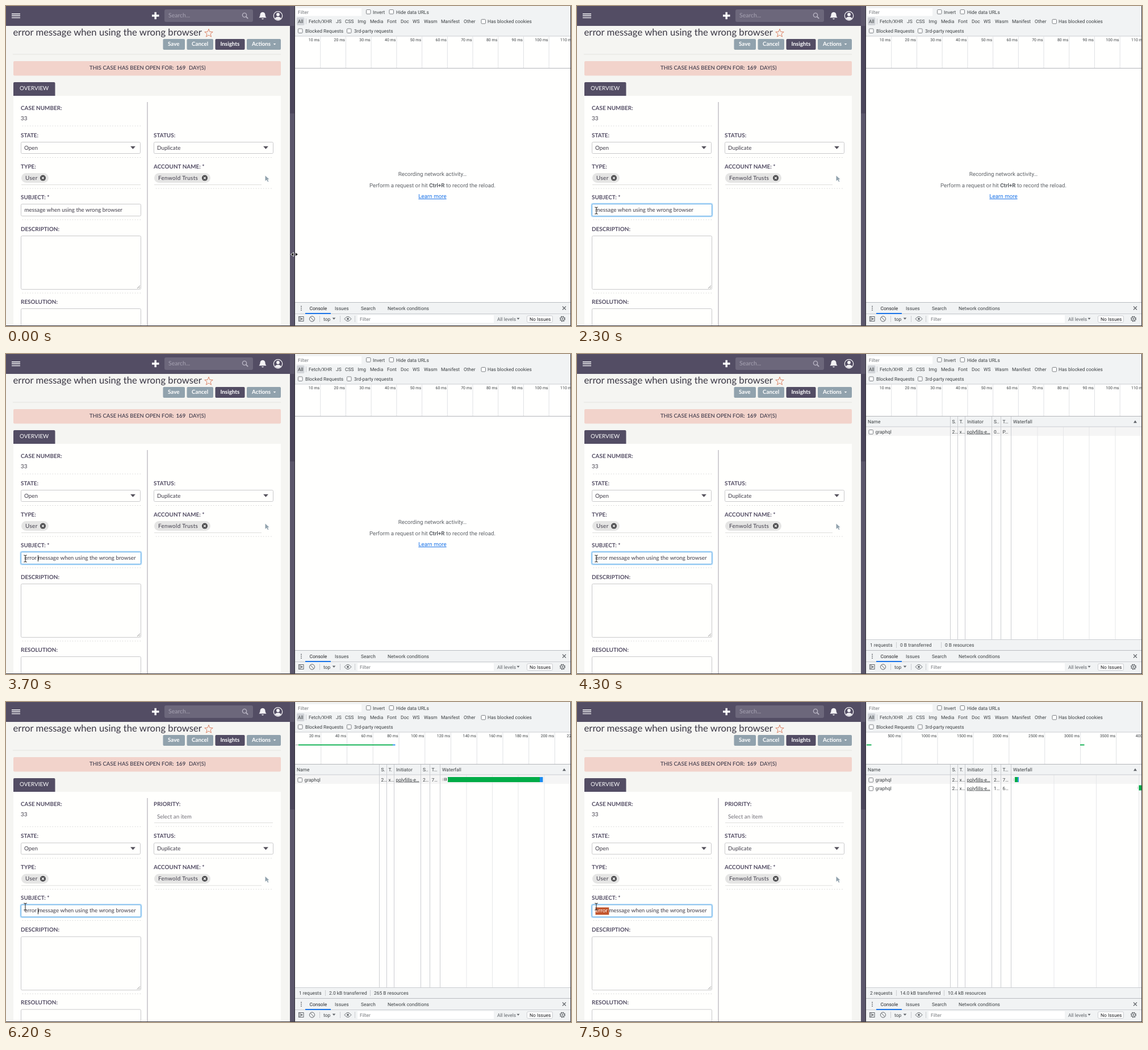
Animation of 995x563 px, one loop 8000 ms. Source, as an HTML page:

```html
<!DOCTYPE html>
<html lang="en">
<head>
<meta charset="utf-8">
<title>Case form and network panel</title>
<style>
html, body { margin: 0; width: 100%; height: 100%; overflow: hidden; background: #f5f5f2; }
svg { display: block; width: 995px; height: 563px; }
text { white-space: pre; fill: #403d4a; text-rendering: geometricPrecision; }
.l { font: 9.85px Lato, sans-serif; }
.b { font: 700 9.95px Lato, sans-serif; fill: #534d64; }
.w { font: 700 9.8px Lato, sans-serif; fill: #fff; }
.n { font: 600 9.6px Lato, sans-serif; fill: #4b4654; }
.chip { font: 10px Lato, sans-serif; letter-spacing: .3px; }
.title { font: 16.7px Lato, sans-serif; fill: #3a3744; }
.r { font: 8.45px Roboto, sans-serif; fill: #3c4043; }
.ms { font: 7px Roboto, sans-serif; fill: #3c4043; text-anchor: end; }
.big { font: 9.75px Roboto, sans-serif; fill: #5f6368; text-anchor: middle; }
</style>
</head>
<body>
<svg id="stage" viewBox="0 0 995 563"></svg>
<script>
const LOOP = 8000, DARK = '#534d64', GREEN = '#00ac47', BLUE = '#1a8cf0';
const stage = document.getElementById('stage');
const pen = document.createElement('canvas').getContext('2d');

const text = (x, y, s, cls = 'l', more = '') => `<text x="${x}" y="${y}" class="${cls}" ${more}>${s}</text>`;
const box = (x, y, w, h, fill, more = '') =>
  `<rect x="${x}" y="${y}" width="${w}" height="${h}" fill="${fill}" ${more}/>`;
const path = (d, fill = 'none', stroke = 'none', width = 1, more = '') =>
  `<path d="${d}" fill="${fill}" stroke="${stroke}" stroke-width="${width}" ${more}/>`;
const disc = (x, y, r, fill, more = '') => `<circle cx="${x}" cy="${y}" r="${r}" fill="${fill}" ${more}/>`;
const frame = (x, y, w, h, color = '#c9c9cb', r = 2, fill = '#fffffd') =>
  box(x + .5, y + .5, w - 1, h - 1, fill, `rx="${r}" stroke="${color}"`);
const hLine = (x1, x2, y, color) => path(`M${x1} ${y}H${x2}`, 'none', color);
const vLine = (x, y1, y2, color = '#cbcdd1') => path(`M${x} ${y1}V${y2}`, 'none', color);
const down = (x, y, w, color) => path(`M${x - w} ${y - w / 2}h${2 * w}l${-w} ${w * 1.15}z`, color);
const dots = (x1, x2, y) => path(`M${x1} ${y}H${x2}`, 'none', '#c6c6c6', 1, 'stroke-dasharray="1.1 3.3"');
const width = s => { pen.font = '9.85px Lato, sans-serif'; return pen.measureText(s).width; };

// Value of the last entry whose time has come.
const at = (t, list) => list.reduce((v, [start, next]) => t >= start ? next : v, list[0][1]);

function pointerAt(t) {
  if (t < 300) return ['resize', 507, 437];
  if (t < 800) {
    const u = Math.floor(t / 100 - 2) / 6, v = 1 - u;
    return ['arrow', v * v * 507 + 2 * u * v * 280 + u * u * 28, v * v * 437 + 2 * u * v * 680 + u * u * 358];
  }
  return ['beam', ...at(t, [[800, [28, 358]], [1000, [34, 361]], [1100, [39, 361]], [1500, [33.2, 360.5]], [1700, [34, 360]]])];
}

const stateAt = t => ({
  pointer: pointerAt(t),
  focus: at(t, [[0, 0], [1700, .5], [1800, 1]]),
  typed: at(t, [[0, 0], [2800, 1], [3100, 2], [3300, 3], [3500, 4], [3600, 5], [3700, 6]]),
  caret: at(t, [[0, 0], [1800, 1], [2300, 0], [2800, 1], [4300, 0], [5000, 1], [5600, 0], [6200, 1], [6800, 0]]),
  selected: t >= 7100,
  shifted: t >= 4400,
  net: at(t, [[0, 0], [4300, 1], [4400, 2], [4600, 3], [7300, 4], [7500, 5]])
});

function header() {
  const button = (x, w, s, tx, fill = '#91a2ad') => box(x, 58, w, 19, fill, 'rx="2"') + text(tx, 70, s, 'w');
  const star = Array.from({ length: 10 }, (_, i) => {
    const a = i * Math.PI / 5, r = i % 2 ? 3.2 : 7.6;
    return `${357 + r * Math.sin(a)},${48 - r * Math.cos(a)}`;
  });
  return box(0, 0, 500, 563, '#f5f5f2') + box(0, 0, 509, 35, DARK)
    + path('M10 14h15M10 17.3h15M10 20.6h15', 'none', '#fff', 1.4)
    + path('M257 17h12.5M263.2 10.8v12.5', 'none', '#fff', 3.4)
    + box(279, 6, 156, 22, '#6c677b', 'rx="3"') + text(286, 20, 'Search...', 'l', 'style="font-size:10.5px;fill:#a7a3b3"')
    + disc(420, 16, 3.6, 'none', 'stroke="#b9b5c4" stroke-width="1.4"') + path('M422.7 18.7l3.4 3.4', 'none', '#b9b5c4', 1.8)
    + path('M445.5 20.5q2-1.8 2-5q0-4 4.5-4.8q4.5.8 4.5 4.8q0 3.2 2 5zM450 22h4q-2 3-4 0z', '#f3f2f5')
    + disc(479, 17.3, 7.7, 'none', 'stroke="#f3f2f5" stroke-width="1.3"') + disc(479, 15, 2.9, '#f3f2f5')
    + path('M473.5 22q1.5-3 5.5-3t5.5 3q-5 4-11 0z', '#f3f2f5')
    + text(12.5, 52.3, 'error message when using the wrong browser', 'title')
    + `<polygon points="${star.join(' ')}" fill="none" stroke="#dc8468"/>`
    + button(276.5, 38.5, 'Save', 285) + button(318.5, 46.5, 'Cancel', 327)
    + button(368.5, 52, 'Insights', 377.5, DARK) + button(424, 60, 'Actions', 433) + down(473, 67, 2.2, '#fff')
    + hLine(12, 484, 85, '#e3e3de')
    + box(13, 97, 471, 25.5, '#f2d3cb', 'rx="2"')
    + text(147, 112, 'THIS CASE HAS BEEN OPEN FOR:', 'n') + text(299.5, 112, '169', 'n', 'style="font-weight:700"')
    + text(322, 112, 'DAY(S)', 'n')
    + path('M13 158v-22q0-2 2-2h69.5q2 0 2 2v22z', DARK) + text(24, 148.2, 'OVERVIEW', 'l', 'style="fill:#fff"')
    + box(13, 158, 471, 405, '#fffffd') + vLine(249, 169, 563, '#a3a0aa');
}

function subject(s) {
  const prefix = 'error '.slice(0, s.typed), w = width(prefix);
  const ring = `<g opacity="${s.focus}">` + box(25.4, 347.4, 213.2, 23.2, 'none', 'rx="3" stroke="#b5dbf8" stroke-width="1.8"')
    + frame(26, 348, 212, 22, '#66afe9') + '</g>';
  return frame(26, 348, 212, 22) + (s.focus ? ring : '')
    + (s.selected ? box(32.5, 353, w, 13, '#c2552d') : '')
    + text(32.5, 362, `<tspan ${s.selected ? 'fill="#fff"' : ''}>${prefix}</tspan>message when using the wrong browser`)
    + (s.caret ? box(Math.round(32 + w), 354, 1, 11, '#222') : '');
}

function form(s) {
  const dy = s.shifted ? 8.4 : 0;
  const select = (x, value) => frame(x, 239, 211, 21) + text(x + 6, 252.7, value) + down(x + 197.5, 249, 4.4, '#55525c');
  const chip = (x, w, value) => box(x, 294, w, 17, '#e5e5e4', 'rx="8.5"') + text(x + 7, 306, value, 'chip')
    + disc(x + w - 10, 302.6, 5, '#4b4b4d') + path(`M${x + w - 12} 300.6l4 4m0-4l-4 4`, 'none', '#fff', 1.2);
  const area = (y, h) => frame(26, y, 212, h) + path(`M231 ${y + h - 2}l5-5M234 ${y + h - 2}l2-2`, 'none', '#777', .8);
  const labels = [[26, 230.7, 'STATE:'], [260, 230.7, 'STATUS:'], [26, 286, 'TYPE:'], [260, 286, 'ACCOUNT NAME: *'],
    [26, 340, 'SUBJECT: *'], [26, 396, 'DESCRIPTION:'], [26, 524, 'RESOLUTION:']];
  const priority = text(260, 182.7, 'PRIORITY:', 'b') + text(266, 204.5, 'Select an item', 'l', 'style="fill:#706e77"')
    + hLine(261, 470, 212.5, '#dededc') + dots(264, 470, 219);
  return text(26, 182.7, 'CASE NUMBER:', 'b') + text(26, 201, '33')
    + (s.shifted ? priority : '')
    + `<g transform="translate(0 ${dy})">`
    + labels.map(([x, y, v]) => text(x, y, v, 'b')).join('')
    + [211, 266.5, 321, 376, 505].map(y => dots(29, 237, y)).join('')
    + [266.5, 321].map(y => dots(264, 470, y)).join('')
    + select(26, 'Open') + select(260, 'Duplicate')
    + chip(27, 48, 'User') + chip(261, 99, 'Fenwold Trusts')
    + hLine(27, 237, 314.5, '#dededc') + hLine(261, 450, 314.5, '#dededc')
    + path('M456.5 298.5l7 6.5h-3l2 3.5-1.6.8-1.8-3.6-2.6 2z', '#91a2ad')
    + subject(s) + area(404, 95) + area(532, 90) + '</g>';
}

const check = (x, y) => box(x + .5, y + .5, 7.5, 7.5, '#fff', 'rx="1.2" stroke="#6f7276" stroke-width=".9"');
const words = (y, list) => list.map(([x, v]) => text(x, y, v, 'r')).join('');

function filters() {
  return box(509, 0, 486, 563, '#fffffe') + box(509, 0, 486, 53, '#f1f3f4')
    + box(511, 4, 115, 13.5, '#fff') + text(514, 13.7, 'Filter', 'r', 'style="fill:#75787c"')
    + check(634, 6) + check(674.5, 6) + words(13.5, [[646, 'Invert'], [687, 'Hide data URLs']])
    + box(512, 20, 13.5, 14, '#d3d6da', 'rx="2"') + vLine(528.5, 22, 32)
    + words(30.2, [[514, 'All'], [533, 'Fetch/XHR'], [581, 'JS'], [597, 'CSS'], [619.5, 'Img'], [641, 'Media'], [671, 'Font'],
      [695, 'Doc'], [716, 'WS'], [736, 'Wasm'], [766, 'Manifest'], [806, 'Other'], [848, 'Has blocked cookies']])
    + check(836.5, 23) + check(514, 39.5) + check(600, 39.5)
    + words(46.8, [[527, 'Blocked Requests'], [613, '3rd-party requests']])
    + hLine(509, 995, 53, '#cbcdd1') + hLine(509, 995, 109.5, '#b4b6ba');
}

function ruler(gap, unit) {
  let out = '';
  for (let i = 1; 509 + (i - 1) * gap < 994; i++) {
    const x = 509 + i * gap;
    out += vLine(x, 53, 109, '#dfe1e4') + text(x - 1.5, 62, `${i * unit} ms`, 'ms');
  }
  return out;
}

function requests(net) {
  const two = net >= 4, done = net === 5;
  const row = (y, size, time) => check(513.5, y - 6.5)
    + words(y, [[525.5, 'graphql'], [660.5, '2…'], [673.5, 'x…'], [734, size], [749.5, time]])
    + text(686.5, y, 'polyfills-e…', 'r', 'text-decoration="underline"');
  let out = box(509, 128, 486, 16, '#f5f5f5')
    + (two ? [840, 914.5, 989.5] : [811, 856.5, 902, 948]).map(x => vLine(x, 128, 502, '#e6e7e9')).join('')
    + box(509, 110, 486, 18, '#f1f3f4') + hLine(509, 995, 128, '#cbcdd1')
    + words(122, [[512, 'Name'], [660.5, 'S.'], [673.5, 'T.'], [687, 'Initiator'], [734, 'S..'], [749.5, 'T…'], [768, 'Waterfall']])
    + path('M980 121.3h6l-3-4.6z', '#5f6368')
    + [657.5, 670.5, 683.5, 730.5, 746.5, 764.5].map(x => vLine(x, 110, 502)).join('')
    + row(139.5, net > 1 ? '2…' : '0…', net > 1 ? '7…' : 'P…');
  if (two) {
    out += box(768.5, 134, 1, 5, '#ccc') + box(771, 132, 5.5, 9, GREEN) + box(776.5, 132, 1.5, 9, BLUE)
      + row(154.5, done ? '1…' : '0…', done ? '6…' : 'P…') + box(510, 74.6, 8.5, 1.8, GREEN);
    if (done) out += box(989.5, 146.5, 4.5, 9, GREEN) + box(987, 149, 1, 4, '#ccc') + box(886, 74.6, 7.5, 1.8, GREEN);
  } else if (net > 1) {
    out += box(768, 134, 2.5, 5, '#ddd') + box(771.5, 133.5, 4.5, 5, '#777') + box(773, 133.5, 1, 5, '#fff')
      + box(778, 132, 162, 9, GREEN) + box(940, 132, 5.5, 9, BLUE)
      + box(510, 75, 5, 1, '#aaa') + box(515, 74.6, 166, 1.8, GREEN) + box(681, 74.6, 4.5, 1.8, BLUE);
  }
  const shift = done ? 5 : 0;
  return out + box(509, 502, 486, 19.5, '#f1f3f4') + hLine(509, 995, 502.5, '#cbcdd1')
    + words(515, [[516, `${two ? 2 : 1} requests`],
      [569, done ? '14.0 kB transferred' : net > 1 ? '2.0 kB transferred' : '0 B transferred'],
      [648 + shift, done ? '10.4 kB resources' : net > 1 ? '265 B resources' : '0 B resources']])
    + vLine(562.5, 507, 517) + vLine(641.5 + shift, 507, 517);
}

function hint() {
  return text(751, 299, 'Recording network activity…', 'big')
    + text(751, 318.5, 'Perform a request or hit <tspan font-weight="700">Ctrl+R</tspan> to record the reload.', 'big')
    + text(751, 338, 'Learn more', 'big', 'style="fill:#1a73e8" text-decoration="underline"');
}

function drawer() {
  const grey = '#5f6368', tabs = [[579, 'Issues'], [625, 'Search'], [672, 'Network conditions']];
  const teeth = disc(980, 550.5, 4.3, 'none', `stroke="${grey}" stroke-width="1.5" stroke-dasharray="1.9 1.48"`);
  return box(509, 521.5, 486, 41.5, '#f1f3f4') + hLine(509, 995, 521.5, '#b9bcc1') + hLine(509, 995, 541.5, '#cbcdd1')
    + [528.5, 531.7, 535].map(y => disc(520, y, .9, grey)).join('')
    + text(534.5, 534.6, 'Console', 'r', 'style="fill:#202124"') + words(534.6, tabs) + box(527, 540, 45, 2, '#1a73e8')
    + path('M980 528.5l6 6m0-6l-6 6', 'none', grey, 1.1)
    + frame(515, 546, 9.5, 9, grey, 0, 'none') + vLine(517.7, 546, 555, grey) + path('M519.3 548.3l3.5 2.2-3.5 2.2z', grey)
    + disc(539, 550.5, 4.6, 'none', `stroke="${grey}"`) + path('M536 547.3l6.2 6.4', 'none', grey)
    + [552.5, 588.5, 614.5].map(x => vLine(x, 545, 556)).join('')
    + text(559, 553.5, 'top', 'r') + down(577.5, 550, 2.8, grey)
    + path('M596 550.5q6-8 12 0q-6 8-12 0z', 'none', grey) + disc(602, 550.5, 1.8, grey)
    + box(619, 544, 240, 13.5, '#fff') + text(623, 553.5, 'Filter', 'r', 'style="fill:#75787c"')
    + text(865, 553.5, 'All levels', 'r', `style="fill:${grey}"`) + down(902, 550, 2.5, grey)
    + frame(917, 544.5, 46, 12.5, '#cbcdd1', 2, '#fff') + text(922, 553.5, 'No Issues', 'r', 'style="fill:#202124"')
    + teeth + disc(980, 550.5, 3.4, 'none', `stroke="${grey}"`) + disc(980, 550.5, 1.2, grey);
}

function pointer([kind, x, y]) {
  const shapes = {
    resize: path('M-.5-3.5v7l-5-3.5zM2.5-3.5v7l5-3.5z', '#000', '#fff', .9),
    arrow: path('M0 0v14l3.3-3 2.2 5 2.2-1-2.2-4.8h4.3z', '#000', '#fff', .9),
    beam: path('M-2.8-6q2.3 0 2.8 1q.5-1 2.8-1M0-5v10M-2.8 6q2.3 0 2.8-1q.5 1 2.8 1', 'none', '#333', 1.1)
  };
  return `<g transform="translate(${x} ${y})">${shapes[kind]}</g>`;
}

function draw(s) {
  const scale = s.net >= 4 ? [62.95, 500] : s.net === 3 ? [45.75, 20] : [44.72, 10];
  stage.innerHTML = header() + form(s)
    + box(500, 0, 9, 563, '#5b566b') + box(500, 35, 8, 154, '#4b465b')
    + filters() + ruler(...scale) + (s.net ? requests(s.net) : hint()) + drawer()
    + box(508, 0, 1, 563, '#2b2933') + box(994, 0, 1, 563, '#3a3942') + box(0, 562, 995, 1, '#3a3942')
    + pointer(s.pointer);
}

let last = '';
function tick(now) {
  const s = stateAt(now % LOOP), key = JSON.stringify(s);
  if (key !== last) draw(s);
  last = key;
  requestAnimationFrame(tick);
}
tick(performance.now());
</script>
</body>
</html>
```
